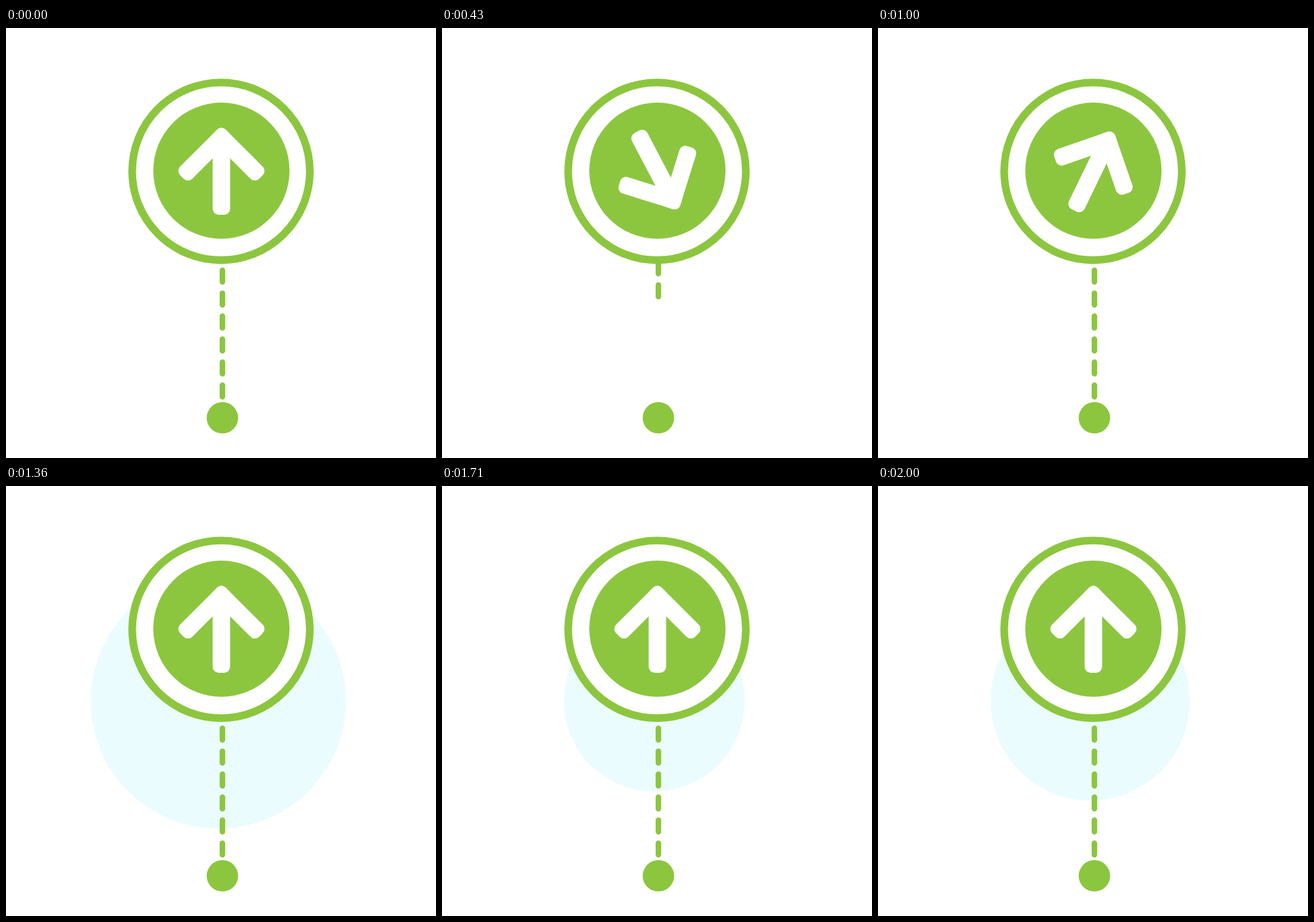
Animation of 640x640 px, one loop 2070 ms. Source, as an HTML page:

```html
<!DOCTYPE html>
<html lang="en">
<head>
<meta charset="utf-8">
<title>Arrow pin</title>
<style>
  html, body { margin: 0; width: 100%; height: 100%; overflow: hidden; background: #fff; }
  svg { display: block; width: 100vw; height: 100vh; }
  .green { fill: #8cc63f; }
  .line { stroke: #8cc63f; }
</style>
</head>
<body>
<svg viewBox="0 0 640 640">
  <circle id="pulse" cx="316" cy="320" r="0" fill="#ebfcff"/>
  <line id="dashes" class="line" x1="322.1" x2="322.1" y1="548.8" y2="300"
        stroke-width="8.3" stroke-linecap="round" stroke-dasharray="17.2 17"/>
  <circle class="line" cx="320" cy="213.3" r="132.2" fill="#fff" stroke-width="11.4"/>
  <circle class="green" cx="320.6" cy="212.4" r="101.4"/>
  <g id="arrow" fill="#fff">
    <rect x="307.6" y="165" width="26" height="113" rx="9"/>
    <rect y="-25.6" width="96" height="25.6" rx="9" transform="translate(320.6 144.8) rotate(135)"/>
    <rect width="96" height="25.6" rx="9" transform="translate(320.6 144.8) rotate(45)"/>
  </g>
  <circle class="green" cx="322.1" cy="580.2" r="23.4"/>
</svg>
<script>
  const LOOP = 2070, STEPS = 29;
  const [pulse, dashes, arrow] = ['pulse', 'dashes', 'arrow'].map(id => document.getElementById(id));

  // Keys are [step, value] pairs, joined by straight ramps.
  const turn = [[0, 0], [7.09, 180], [15.16, 0]];
  const lift = [[0, 0], [8.17, 203], [13.6, 0]];
  const radius = [[15.95, 0], [17.6, 296.5], [21.5, 0], [27, 296.5], [29, 0]];

  function ramp(keys, s) {
    if (s <= keys[0][0]) return keys[0][1];
    for (let k = 1; k < keys.length; k++) {
      const [s0, v0] = keys[k - 1], [s1, v1] = keys[k];
      if (s <= s1) return v0 + (v1 - v0) * (s - s0) / (s1 - s0);
    }
    return keys[keys.length - 1][1];
  }

  function draw() {
    // The motion holds each step, with changes on whole hundredths of a second.
    const t = performance.now() % LOOP;
    const step = Math.floor((Math.floor(t / 10) + 0.4) * 10 * STEPS / LOOP);
    arrow.setAttribute('transform', `rotate(${ramp(turn, step)} 320.6 212.4)`);
    dashes.setAttribute('y1', 548.8 - ramp(lift, step));
    pulse.setAttribute('r', ramp(radius, step));
    requestAnimationFrame(draw);
  }
  draw();
</script>
</body>
</html>
```
